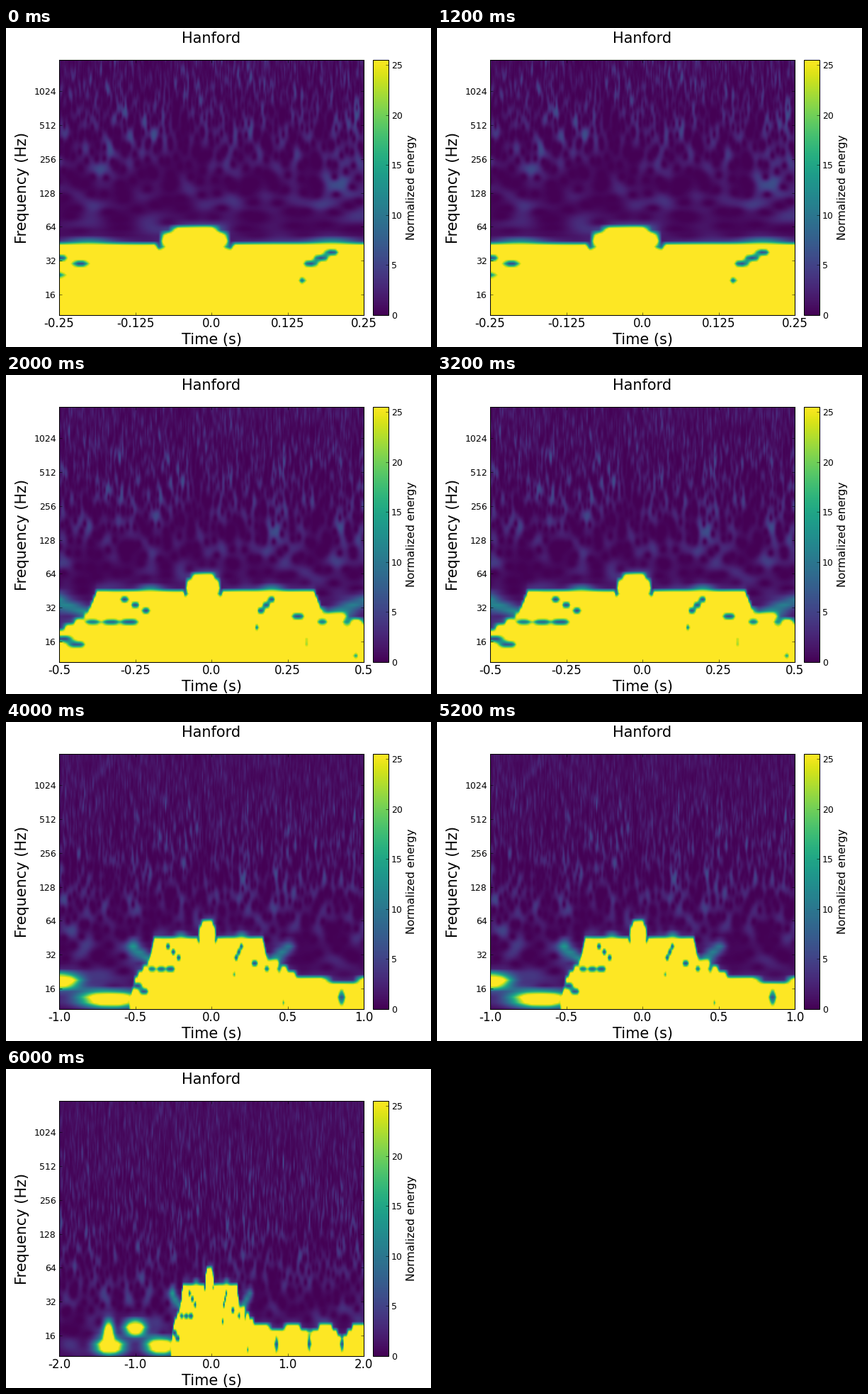
A matplotlib script for the animation above (8 s loop, 600 by 450 pixels).

```python
import numpy as np
import matplotlib.pyplot as plt
from matplotlib.animation import FuncAnimation

plt.rcParams["font.family"] = "DejaVu Sans"

WIDTH, HEIGHT, DPI = 600, 450, 75
LEFT, RIGHT, TOP, BOTTOM = 75, 505, 45, 405
VMAX = 25.5
SPANS = [0.25, 0.5, 1.0, 2.0]
OCTAVE = 47.8                     # stage pixels per octave
ROWS = np.linspace(TOP, BOTTOM, 181)
COLUMNS = 256
RATE, LENGTH = 4096, 16384        # four seconds of noise

# Coarse tiles that carry the loud low-frequency part
TILE_T = np.arange(-256, 257) / 128
TILE_ROWS = np.arange(TOP, BOTTOM + 1, 8)

PLATEAU = 306
DOME_CENTER, DOME_HALF = -0.0275, 0.056
RIPPLE_START, RIPPLE_PERIOD = 0.64, 0.43


def row_of(octave):
    return 376 - OCTAVE * (octave - 4)


def frequency(row):
    return 2 ** (4 + (376 - row) / OCTAVE)


def upper_edge(t):
    """Row of the upper border of the saturated region."""
    times = [-.55, -.5, -.41, -.375, .335, .36, .43, .6]
    rows = [420, 362, 340, PLATEAU, PLATEAU, 333, 340, 364]
    edge = np.interp(t, times, rows)

    u = np.clip(np.abs(t - DOME_CENTER) / DOME_HALF, 0, 1)
    edge -= 24 * (1 - u ** 2.5) ** 0.4

    late = np.maximum(t - 0.6, 0)
    ripple = np.cos(2 * np.pi * (t - RIPPLE_START) / RIPPLE_PERIOD)
    return edge + np.where(late > 0, 4 * late - (2 + 6 * late) * ripple, 0)


def glows():
    """Soft spots as (time, row, half width, half height, energy)."""
    for k in (-1, 0, 1):
        yield -1 + k / 3, 366 + 26 * abs(k), .13 + .05 * abs(k), 10, 45
    yield -1.35, 375, .065, 18, 40
    for side in (-1, 1):
        yield side * .2, 303, .04, 6, 10
        for k in range(3):
            yield side * (.42 + .045 * k), 335 - 9 * k, .04, 8, 9


def gaps():
    """Holes as (time, row, half width, half height)."""
    for side in (-1, 1):
        yield DOME_CENTER + side * DOME_HALF, 309, .006, 4.5
    lines = [((-.215, 333), (-.285, 317), .013),
             ((.163, 333), (.197, 317), .011),
             ((-.27, 349), (-.39, 347), .03),
             ((-.44, 381), (-.49, 373), .025),
             ((.284, 341), (.445, 352), .02),
             ((.151, 357), (.473, 397), .005)]
    for start, end, width in lines:
        for t, row in np.linspace(start, end, 3):
            yield t, row, width, 4.5
    for k in range(3):
        yield RIPPLE_START + (k + .5) * RIPPLE_PERIOD, 389, .025, 10


def resample(grid, old, new):
    return np.array([np.interp(new, old, line) for line in grid])


def loud_tiles():
    y = TILE_ROWS[:, None]

    def radius(t, row, wt, wy):
        return ((TILE_T - t) / wt) ** 2 + ((y - row) / wy) ** 2

    depth = y - upper_edge(TILE_T)
    energy = 32 * np.clip(0.5 + depth / 4, 0, 1)
    energy += 4 * np.exp(np.minimum(depth, 0) / 6)
    for *spot, peak in glows():
        energy += peak * np.exp(-radius(*spot))
    energy = np.minimum(energy, 32)
    for gap in gaps():
        energy *= 1 - 0.85 * np.exp(-radius(*gap) ** 2)
    return resample(energy.T, TILE_ROWS, ROWS).T


def noise_field():
    """Energy of white noise in bands whose width grows with frequency."""
    rng = np.random.default_rng(14)
    spectrum = rng.normal(size=LENGTH) + 1j * rng.normal(size=LENGTH)
    freqs = np.arange(LENGTH) * RATE / LENGTH
    field = np.empty((len(ROWS), LENGTH), dtype=np.float32)
    for i, f in enumerate(frequency(ROWS)):
        band = np.exp(-0.5 * ((freqs - f) / (f / 9)) ** 2)
        energy = np.abs(np.fft.ifft(spectrum * band)) ** 2
        field[i] = 7 * np.tanh(1.1 * energy / energy.mean() / 7)
    return field


def view(noise, loud, span):
    """Energy map for times between -span and span."""
    half = int(span * RATE)
    part = noise[:, LENGTH // 2 - half:LENGTH // 2 + half]
    quiet = part.reshape(len(ROWS), COLUMNS, -1)[:, :, :32].mean(axis=2)
    t = span * (2 * (np.arange(COLUMNS) + 0.5) / COLUMNS - 1)
    return np.minimum(quiet + resample(loud, TILE_T, t), VMAX)


def pixel_axes(x0, x1):
    return fig.add_axes([x0 / WIDTH, 1 - BOTTOM / HEIGHT,
                         (x1 - x0) / WIDTH, (BOTTOM - TOP) / HEIGHT])


def label(x, y, text, size, rotation=0):
    fig.text(x / WIDTH, 1 - y / HEIGHT, text, fontsize=size, ha="center",
             va="baseline", rotation=rotation, rotation_mode="anchor")


fig = plt.figure(figsize=(WIDTH / DPI, HEIGHT / DPI), dpi=DPI, facecolor="white")
ax = pixel_axes(LEFT, RIGHT)
noise, loud = noise_field(), loud_tiles()
views = [view(noise, loud, span) for span in SPANS]

image = ax.imshow(views[0], cmap="viridis", vmin=0, vmax=VMAX, aspect="auto",
                  interpolation="bilinear", extent=(-1, 1, BOTTOM, TOP))
ax.set_yticks([row_of(k) for k in range(4, 11)],
              [str(2 ** k) for k in range(4, 11)])
ax.tick_params(direction="in", length=4, width=0.5, pad=4, top=True, right=True)
ax.tick_params(axis="x", labelsize=16, pad=3)
ax.tick_params(axis="y", labelsize=12)

bar_ax = pixel_axes(518, 540)
bar = fig.colorbar(image, cax=bar_ax, ticks=range(0, 26, 5))
bar_ax.tick_params(direction="in", length=4, width=0.5, pad=4, labelsize=12)
for spine in [*ax.spines.values(), bar.outline]:
    spine.set_linewidth(1)

label(290, 21, "Hanford", 20)
label(290, 446, "Time (s)", 20)
label(29, 225, "Frequency (Hz)", 20, 90)
label(577.5, 225, "Normalized energy", 15, 90)


def update(frame):
    span = SPANS[frame]
    image.set_data(views[frame])
    image.set_extent((-span, span, BOTTOM, TOP))
    ax.set_xlim(-span, span)
    ticks = [span * k / 2 for k in range(-2, 3)]
    ax.set_xticks(ticks, [str(v) for v in ticks])
    return [image]


anim = FuncAnimation(fig, update, frames=len(SPANS), interval=2000,
                     repeat=True, repeat_delay=0, blit=False)
plt.show()
```
